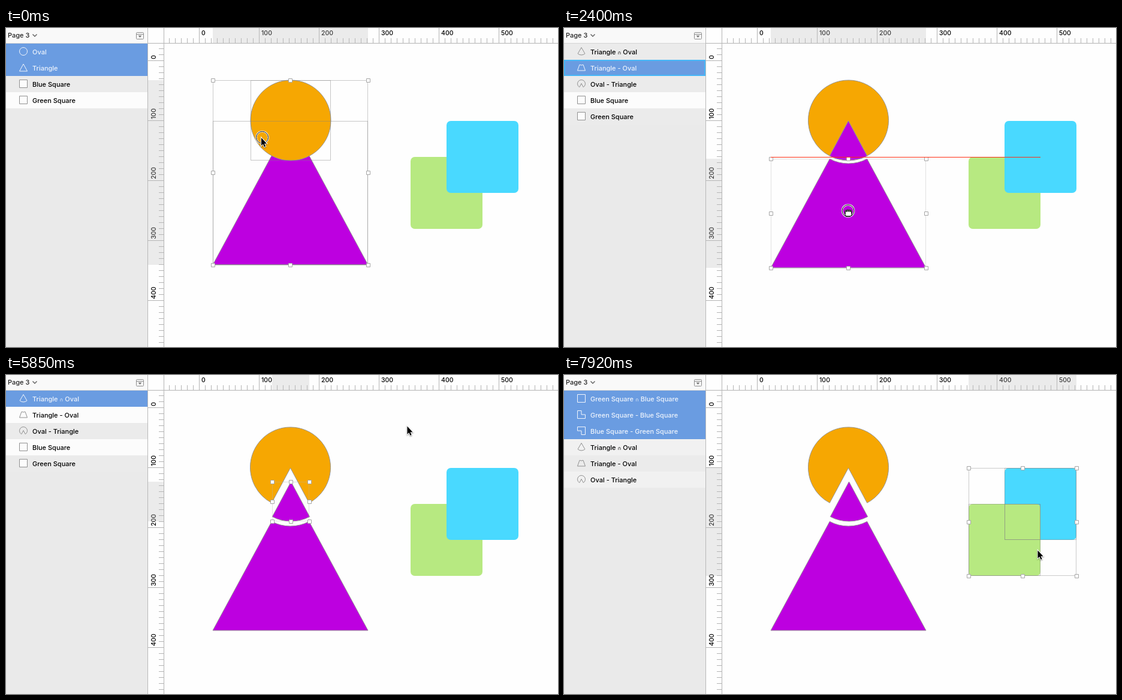
Write an HTML page with a canvas that moves like this. It is 921 px wide and 532 px high and loops after 8000 ms.

```html
<!DOCTYPE html>
<html lang="en">
<head>
<meta charset="utf-8">
<title>Splitting shapes</title>
<style>
html, body { margin: 0; width: 100%; height: 100%; overflow: hidden; background: #fefefe; }
canvas { display: block; }
</style>
</head>
<body>
<canvas id="stage" width="921" height="532"></canvas>
<script>
const ctx = document.getElementById('stage').getContext('2d');
const FONT = '500 11px Inter, sans-serif';
const ORANGE = '#f6a702', PURPLE = '#bd00e0', GREEN = '#b7e981', BLUE = '#49d9ff';
const EDGE = '#969696', SELECTED = '#6a9ce1', HOVER = '#47b7f8', GUIDE = '#ff2d12';

// Moments of the story, in ms
const LOOP = 8000, STEP = 150;
const SPLIT = 600, DESELECT = 1500, GRAB_BASE = 2250, DROP_BASE = 3000;
const PRESS_TIP = 3300, DRAG_TIP = 3600, DROP_TIP = 4500;
const MARQUEE = 6000, MARQUEE_HIT = 6300, RELEASE = 6710, SPLIT_SQUARES = 7710;

// Pointer moves: start, end, destination
const START = [425.5, 182.5];
const MOVES = [
  [900, 1200, 433, 422.5],
  [1650, 2100, 472, 300],
  [GRAB_BASE, 2850, 472, 331],
  [DROP_BASE, PRESS_TIP, 472, 202.5],
  [DRAG_TIP, 4050, 472, 218.5],
  [4950, 5250, 610, 191],
  [5400, 5850, 669, 85],
  [MARQUEE, 6450, 785, 285],
  [6600, 7050, 790, 292]
];

// The circle, the triangle, and where their edges cross
const CX = 474.5, CY = 154, R = 67, APEX = 155, BASE = 395, HALF = 129.5;
const CUT = Math.atan2(59.3, 31.2);
const CUT_X = R * Math.cos(CUT), CUT_Y = CY + R * Math.sin(CUT);
const SIDE = 120;

const within = (t, from, to) => t >= from && t < to;

function ease(t, from, to) {
  const p = Math.min(1, Math.max(0, (t - from) / (to - from)));
  return p * p * (3 - 2 * p);
}

function pointerAt(t) {
  return MOVES.reduce(([px, py], [from, to, x, y]) => {
    const p = ease(t, from, to);
    return [px + (x - px) * p, py + (y - py) * p];
  }, START);
}

const isHeld = t => t < STEP || within(t, DESELECT, DESELECT + STEP) ||
  within(t, GRAB_BASE, DROP_BASE) || within(t, PRESS_TIP, DROP_TIP) || within(t, MARQUEE, RELEASE);
const isDragging = t => within(t, GRAB_BASE + STEP, DROP_BASE) || within(t, DRAG_TIP, DROP_TIP);

function line(x1, y1, x2, y2, color) {
  ctx.beginPath();
  ctx.moveTo(x1, y1);
  ctx.lineTo(x2, y2);
  paint(null, color);
}

function rect(x, y, w, h, color) {
  ctx.fillStyle = color;
  ctx.fillRect(x, y, w, h);
}

function text(str, x, y, color = '#000', font = FONT) {
  ctx.font = font;
  ctx.fillStyle = color;
  ctx.fillText(str, x, y);
  return x + ctx.measureText(str).width;
}

function polygon(...points) {
  ctx.beginPath();
  points.forEach(([x, y]) => ctx.lineTo(x, y));
  ctx.closePath();
}

function paint(fill, stroke = EDGE, width = 1) {
  if (fill) {
    ctx.fillStyle = fill;
    ctx.fill();
  }
  if (stroke) {
    ctx.strokeStyle = stroke;
    ctx.lineWidth = width;
    ctx.stroke();
  }
}

function circle(x, y, r) {
  ctx.beginPath();
  ctx.arc(x, y, r, 0, 2 * Math.PI);
}

function sector(x, tipY, cy, r, cut, outside) {
  ctx.beginPath();
  ctx.moveTo(x, tipY);
  ctx.arc(x, cy, r, cut, Math.PI - cut, outside);
  ctx.closePath();
}

function bittenBase(x, baseY, half, cy, r, cut) {
  ctx.beginPath();
  ctx.moveTo(x - half, baseY);
  ctx.arc(x, cy, r, Math.PI - cut, cut, true);
  ctx.lineTo(x + half, baseY);
  ctx.closePath();
}

function notched(x, y, s) {
  polygon([x - s, y - s], [x, y - s], [x, y], [x + s, y], [x + s, y + s], [x - s, y + s]);
}

// Each icon is centred on x, y
const ICONS = {
  oval: (x, y) => circle(x, y, 6.5),
  triangle: (x, y) => polygon([x, y - 6], [x + 6.5, y + 6], [x - 6.5, y + 6]),
  square: (x, y) => polygon([x - 6.5, y - 6.5], [x + 6.5, y - 6.5], [x + 6.5, y + 6.5], [x - 6.5, y + 6.5]),
  cone: (x, y) => sector(x, y - 6.5, y - 3, 9, 0.85, false),
  base: (x, y) => bittenBase(x, y + 5, 6.5, y - 10, 6, 1.05),
  pie: (x, y) => sector(x, y - 0.5, y, 6.5, 1.05, true),
  ell: (x, y) => notched(x, y, 6.5),
  hook: (x, y) => notched(x, y, -6.5)
};

const SQUARES = [['square', 'Blue Square'], ['square', 'Green Square']];
const WHOLE = [['oval', 'Oval'], ['triangle', 'Triangle']];
const PIECES = [['cone', 'Triangle ∩ Oval'], ['base', 'Triangle - Oval'], ['pie', 'Oval - Triangle']];
const SQUARE_PIECES = [
  ['square', 'Green Square ∩ Blue Square'],
  ['ell', 'Green Square - Blue Square'],
  ['hook', 'Blue Square - Green Square']
];

function layerRows(t) {
  if (t < SPLIT) return [...WHOLE, ...SQUARES];
  return t < SPLIT_SQUARES ? [...PIECES, ...SQUARES] : [...SQUARE_PIECES, ...PIECES];
}

function selectedLayers(t) {
  if (t < SPLIT) return WHOLE;
  if (t < DESELECT) return PIECES;
  if (t < GRAB_BASE) return [];
  if (t < PRESS_TIP) return [PIECES[1]];
  if (t < MARQUEE + STEP) return [PIECES[0]];
  if (t < MARQUEE_HIT) return [];
  return t < SPLIT_SQUARES ? SQUARES : SQUARE_PIECES;
}

function hoveredLayer(t) {
  if (within(t, GRAB_BASE - STEP, DROP_BASE + STEP)) return PIECES[1];
  return within(t, PRESS_TIP, DROP_TIP) ? PIECES[0] : null;
}

function drawLabel(label, y, color) {
  const [left, right] = label.split('∩');
  const x = text(left, 44, y, color);
  if (right) text(right, text('∩', x, y, color, '8px "DejaVu Sans", sans-serif'), y, color);
}

function drawHeader() {
  rect(0, 0, 236, 26, '#f9f9f9');
  text('Page 3', 3, 16, '#222');
  ctx.beginPath();
  ctx.moveTo(44.5, 10.5);
  ctx.lineTo(48, 14);
  ctx.lineTo(51.5, 10.5);
  paint(null, '#666', 1.5);
  ctx.beginPath();
  ctx.roundRect(217.5, 7.5, 12, 11, 1);
  paint(null, '#8c8c8c');
  line(217, 10.5, 230, 10.5, '#8c8c8c');
  polygon([220.5, 12.5], [226.5, 12.5], [223.5, 16]);
  paint('#777', null);
  line(0, 25.5, 236, 25.5, '#d5d5d5');
}

function drawSidebar(t) {
  rect(0, 0, 236, 532, '#eaeaea');
  drawHeader();
  const chosen = selectedLayers(t), hovered = hoveredLayer(t);
  const oddRow = t < SPLIT_SQUARES ? '#fcfcfc' : '#f1f1f1';
  layerRows(t).forEach((layer, i) => {
    const [icon, label] = layer, y = 26 + i * 27, on = chosen.includes(layer);
    rect(0, y, 236, 27, on ? SELECTED : i % 2 ? oddRow : '#ebebeb');
    if (layer === hovered) {
      ctx.strokeStyle = HOVER;
      ctx.lineWidth = 2;
      ctx.strokeRect(1, y + 1, 234, 25);
    }
    ICONS[icon](29, y + 13);
    paint(!on && icon === 'square' ? '#fcfcfc' : null, on ? '#f2f6fc' : '#909090');
    drawLabel(label, y + 18, on ? '#edf3fc' : '#000');
  });
}

function drawRulers(box) {
  const tick = '#b4b4b4', labelFont = '500 10.5px Inter, sans-serif';
  rect(237, 0, 684, 25, '#fefefe');
  rect(237, 0, 26, 532, '#fefefe');
  for (let v = -50; v < 600; v += 10) {
    const major = v % 100 === 0, x = 322.5 + v, y = 54.5 + v;
    if (x > 264) line(x, major ? 0 : 17, x, 25, tick);
    if (y > 26) line(major ? 237 : 255, y, 263, y, tick);
    if (!major) continue;
    text(v, x + 3.5, 12, '#000', labelFont);
    ctx.save();
    ctx.translate(250, y - 2.5);
    ctx.rotate(-Math.PI / 2);
    text(v, 0, 0, '#000', labelFont);
    ctx.restore();
  }
  if (box) {
    const shade = 'rgba(190,190,190,.3)';
    rect(box[0], 0, box[2] - box[0], 25, shade);
    rect(237, box[1], 26, box[3] - box[1], shade);
  }
  line(236.5, 0, 236.5, 532, '#b8b8b8');
  line(263.5, 0, 263.5, 532, tick);
  line(237, 25.5, 921, 25.5, tick);
}

// Everything on the canvas that moves, at time t
function sceneAt(t) {
  const stepped = Math.floor(t / STEP) * STEP;
  const baseDrop = Math.round(31 * ease(stepped, GRAB_BASE, 2850));
  const tipDrop = Math.round(23 * ease(stepped, DRAG_TIP, 4050));
  const tipShift = t < 4350 ? 0 : 1;
  const tiles = [{ x: 675, y: 215, color: GREEN }, { x: 735, y: 155, color: BLUE }];
  if (t >= SPLIT_SQUARES) tiles.reverse();
  return { baseDrop, tipDrop, tipShift, tiles, pointer: pointerAt(stepped) };
}

function layerBox([icon, label], scene) {
  const { baseDrop, tipDrop, tipShift, tiles } = scene;
  const round = box => box.map(Math.floor);
  const tileBox = ({ x, y }) => [x, y, x + SIDE, y + SIDE];
  const green = tileBox(tiles.find(s => s.color === GREEN));
  const blue = tileBox(tiles.find(s => s.color === BLUE));
  switch (icon) {
    case 'oval': return round([CX - R + 0.5, CY - R, CX + R + 0.5, CY + R]);
    case 'pie': return round([CX - R + 0.5, CY - R, CX + R + 0.5, CUT_Y]);
    case 'triangle': return [CX - HALF, APEX, CX + HALF, BASE];
    case 'base': return round([CX - HALF, CUT_Y + baseDrop, CX + HALF, BASE + baseDrop]);
    case 'cone': return round([CX - CUT_X + tipShift, APEX + tipDrop, CX + CUT_X + tipShift, CY + R + tipDrop]);
    case 'ell': return green;
    case 'hook': return blue;
  }
  if (label.includes('∩')) return [blue[0], green[1], green[2], blue[3]];
  return label.startsWith('Blue') ? blue : green;
}

const union = boxes => boxes.reduce((a, b) => a.map((v, i) => (i < 2 ? Math.min : Math.max)(v, b[i])));

function frameBox([x1, y1, x2, y2], color) {
  ctx.strokeStyle = color;
  ctx.lineWidth = 1;
  ctx.strokeRect(x1 + 0.5, y1 + 0.5, x2 - x1 - 1, y2 - y1 - 1);
}

function drawHandles([x1, y1, x2, y2]) {
  const mx = Math.floor((x1 + x2) / 2), my = Math.floor((y1 + y2) / 2);
  for (const x of [x1, mx, x2]) {
    for (const y of [y1, my, y2]) {
      if (x === mx && y === my) continue;
      ctx.beginPath();
      ctx.rect(x - 2.5, y - 2.5, 6, 6);
      paint('#fff', '#a6a6a6');
    }
  }
}

function drawSelection(boxes, bounds) {
  const many = boxes.length > 1;
  frameBox(bounds, many ? 'rgba(140,140,140,.45)' : 'rgba(180,180,180,.4)');
  if (many) boxes.forEach(box => frameBox(box, 'rgba(130,130,130,.45)'));
  drawHandles(bounds);
}

function drawGuides(t, { baseDrop, tipDrop }) {
  if (!isDragging(t)) return;
  const guide = (y, x1, x2) => line(x1, y + 0.5, x2, y + 0.5, GUIDE);
  const left = CX - HALF, right = CX + HALF;
  if (t < DROP_BASE) {
    if (baseDrop < 6) guide(215, left, 675 + SIDE);
    if (baseDrop === 31) guide(335, left, 675 + SIDE);
  } else {
    if (tipDrop === 0) guide(155, CX - CUT_X, 735 + SIDE);
    if (tipDrop === 23) guide(244, left, right);
  }
}

function drawHand(x, y) {
  ctx.beginPath();
  ctx.roundRect(x - 5, y - 3, 11, 9, 3);
  for (let i = 0; i < 4; i++) ctx.roundRect(x - 5 + i * 2.7, y - 5 + (i % 3 ? 0 : 1), 2.8, 6, 1.4);
  paint('#fff', '#000');
  ctx.beginPath();
  ctx.roundRect(x - 4, y - 1, 9, 6, 2);
  paint('#fff', null);
}

function drawPointer(t, [x, y]) {
  if (isHeld(t)) {
    circle(x + 2, y, 10);
    paint(null, '#fff', 2.6);
    paint(null, '#000', 1);
  }
  if (isDragging(t)) return drawHand(x + 2, y + 3);
  ctx.save();
  ctx.translate(x, y);
  ctx.scale(0.95, 0.95);
  ctx.shadowColor = 'rgba(0,0,0,.35)';
  ctx.shadowBlur = 2;
  ctx.shadowOffsetY = 1;
  polygon([0.5, 0.5], [0.5, 14.5], [3.6, 11.5], [5.8, 16.6], [8, 15.7], [5.8, 10.7], [10, 10.7]);
  paint('#000', '#fff', 2);
  ctx.shadowColor = 'transparent';
  paint('#000', null);
  ctx.restore();
}

function drawShapes(t, { baseDrop, tipDrop, tipShift, tiles }) {
  if (t < SPLIT) {
    polygon([CX, APEX], [CX + HALF, BASE], [CX - HALF, BASE]);
    paint(PURPLE);
    circle(CX + 0.5, CY, R);
    paint(ORANGE);
  } else {
    const hovered = hoveredLayer(t);
    sector(CX, APEX, CY, R, CUT, true);
    paint(ORANGE);
    bittenBase(CX, BASE + baseDrop, HALF, CY + baseDrop, R, CUT);
    paint(PURPLE);
    if (hovered === PIECES[1] && t < GRAB_BASE + STEP) paint(null, HOVER, 2);
    sector(CX + tipShift, APEX + tipDrop, CY + tipDrop, R, CUT, false);
    paint(PURPLE);
    if (hovered === PIECES[0] && t < PRESS_TIP + STEP) paint(null, HOVER, 2);
  }
  for (const { x, y, color } of tiles) {
    ctx.beginPath();
    ctx.roundRect(x, y, SIDE, SIDE, 7);
    paint(color, null);
  }
}

function draw(t) {
  const scene = sceneAt(t);
  rect(0, 0, 921, 532, '#fefefe');
  drawShapes(t, scene);

  // The canvas selection follows a fresh press one step after the list does.
  const pressed = within(t, PRESS_TIP, PRESS_TIP + STEP);
  const boxes = (pressed ? [PIECES[1]] : selectedLayers(t)).map(layer => layerBox(layer, scene));
  const bounds = boxes.length ? union(boxes) : null;
  if (bounds) drawSelection(boxes, bounds);
  drawGuides(t, scene);

  const sweeping = within(t, MARQUEE + STEP, RELEASE);
  if (sweeping) {
    const [x0, y0] = pointerAt(MARQUEE), [x, y] = scene.pointer;
    rect(x0, y0, x - x0, y - y0, 'rgba(120,120,120,.1)');
    frameBox([x0, y0, x, y], 'rgba(120,120,120,.6)');
  }
  drawRulers(sweeping ? null : bounds);
  drawSidebar(t);
  drawPointer(t, scene.pointer);
}

function tick(now) {
  draw(now % LOOP);
  requestAnimationFrame(tick);
}
requestAnimationFrame(tick);
</script>
</body>
</html>
```
